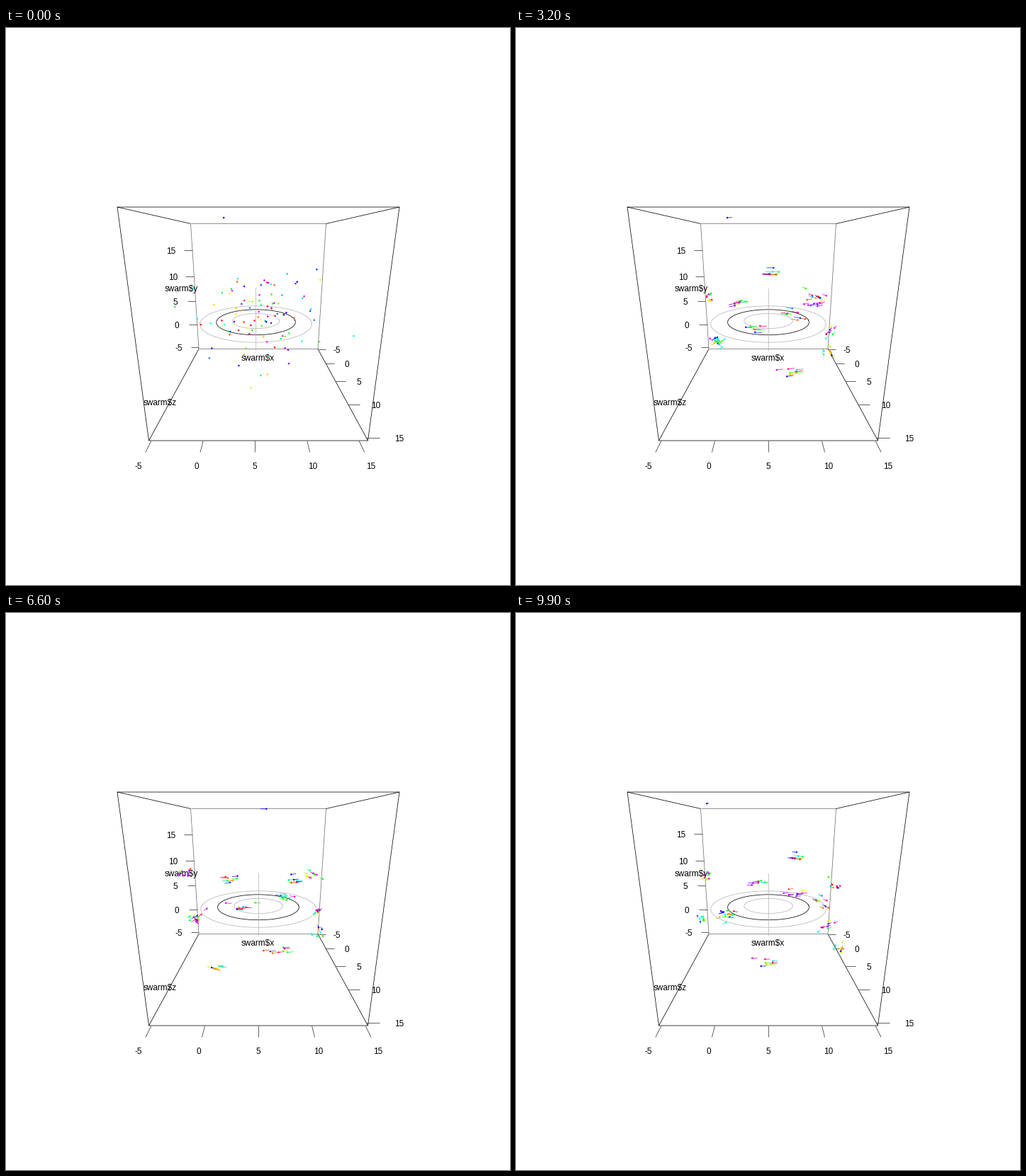
A matplotlib script that plays this animation: 711 by 787 pixels, repeating every 10000 ms.

```python
import numpy as np
import matplotlib.pyplot as plt
from matplotlib.animation import FuncAnimation
from matplotlib.collections import LineCollection
from matplotlib.colors import hsv_to_rgb

W, H, FRAMES, STEP = 711, 787, 100, 100
CX = 355.5
PT = 0.72  # points per pixel at 100 dpi
VALUES = range(-5, 16, 5)
LEFT, RIGHT, FLOOR, BACK, FRONT = -5.25, 15.25, -5.45, -5.28, 15.47
rng = np.random.default_rng(12)

fig = plt.figure(figsize=(W / 100, H / 100), dpi=100, facecolor="white")
ax = fig.add_axes([0, 0, 1, 1])
ax.set_xlim(-0.5, W - 0.5)
ax.set_ylim(H - 0.5, -0.5)
ax.axis("off")


def project(x, y, z, q=0):
    """Perspective view of the box; q widens the x range at the start."""
    u = (x - 5) / 10.25 * (1 - 0.029 * q) - 0.029 * q
    v = (y - FLOOR) / 25.2
    s = (z - BACK) / 20.75
    w = 0.011876 - 0.001425 * v - 0.00542 * s
    return CX + u / w, (5.380 - 2.495 * v - 1.61 * s) / w


def segments(lines, color):
    return ax.add_collection(
        LineCollection(lines, colors=color, linewidths=0.75 * PT))


def label(x, y, text):
    return ax.text(x, y, text, ha="center", va="center_baseline", zorder=4,
                   family="Liberation Sans", fontsize=11.8 * PT,
                   parse_math=False)


def outward(x, scale):
    return CX + scale * (x - CX)


# Box: top left, top right, bottom right, bottom left
back = [(260, 276), (451, 276), (439.5, 453), (271.5, 453)]
front = [(156.5, 252.5), (554.5, 252.5), (510, 582.5), (201, 582.5)]
segments([back[2:], back[:2], back[1:3], back[::3]], "#6e6e6e")
segments([front + front[:1], *zip(back, front)], "black")

# Axis names, ticks and tick labels
for x, y, name in [(355, 465.5, "x"), (246.5, 367, "y"), (217, 528, "z")]:
    label(x, y, "swarm$" + name)

z_lines = []
for val in VALUES:
    x, y = project(RIGHT, FLOOR, val)
    z_lines.append([(x, y), (outward(x, 1.127), y)])
    label(outward(x, 1.305), y + 0.5, str(val))
segments(z_lines, "#333333")

x_ticks = segments([], "#333333")
y_ticks = segments([], "#333333")
x_labels = [label(0, 618.5, str(v)) for v in VALUES]
y_labels = [label(0, 0, str(v)) for v in VALUES]

# Rings and pole around which the swarm turns
circle = np.linspace(0, 2 * np.pi, 181)
rings = [(r, ax.plot([], [], color=c, lw=0.75 * PT)[0])
         for r, c in [(3, "#b4b4b4"), (5, "black"), (7, "#b4b4b4")]]
pole, = ax.plot([], [], color="#b4b4b4", lw=0.75 * PT)

# Flocks on stacked orbits; the last "flock" is one loner near the ceiling
FLOCKS, N = 12, 100
flock_height = np.r_[np.linspace(362, 468, FLOCKS), 271]
flock_phase = 2.28 + 2.4 * np.r_[1:FLOCKS + 1, 0]
flock_rad = np.r_[rng.uniform(72, 92, FLOCKS), 75]
LONER_TILT = -0.06

# Members: a scattered start that settles into a place within the flock
home = np.r_[rng.permutation(np.arange(N - 1) % FLOCKS), FLOCKS]
grouped = home < FLOCKS
along, across, rise = rng.normal(0, [[8.5], [4], [2.6]], (3, N)) * grouped
height, phase, rad = flock_height[home], flock_phase[home], flock_rad[home]
lead = rng.uniform(-np.pi, np.pi, N) * grouped
rad_gap = (np.hypot(*rng.normal(0, 40, (2, N))) - rad) * grouped
height_gap = (np.clip(rng.normal(408, 35, N), 330, 480) - height) * grouped
colors = hsv_to_rgb([(h, 1, 1) for h in np.r_[np.arange(N - 1) / N, 0.68]])

arrows = LineCollection([], colors=colors, linewidths=0.75 * PT, zorder=5)
ax.add_collection(arrows)
dots = ax.scatter(np.zeros(N), np.zeros(N), s=(2.5 * PT) ** 2,
                  c=colors, linewidths=0, zorder=6)


def swarm(t):
    """Places of all members and their directions on screen."""
    loose = np.clip(1 - t / 18, 0, 1) ** 1.5
    tight = 1 - loose
    ang = phase - 15 * (1 - np.exp(-t / 60)) + loose * lead
    r = rad + 0.2 * t + loose * rad_gap + tight * across
    level = height + loose * height_gap
    k = np.where(grouped, 0.00227 * (level - 272), LONER_TILT)
    u = tight * along
    sin, cos = np.sin(ang), np.cos(ang)
    x = CX + r * cos + u * sin
    y = level + k * (r * sin - u * cos) + tight * rise
    return np.c_[x, y], np.c_[sin, -k * cos]


def draw(t):
    q = max(0, 1 - t / 8)

    x_lines, y_lines = [], []
    for i, val in enumerate(VALUES):
        x = project(val, FLOOR, FRONT, q)[0]
        x_lines.append([(x, 583), (outward(x, 1.053), 599)])
        x_labels[i].set_x(outward(x, 1.118))

        x, y = project(LEFT, val, BACK)
        y += 0.45 * i * (0.4 - t / FRAMES)
        y_lines.append([(x, y), (outward(x, 1.13), y)])
        y_labels[i].set_position((outward(x, 1.327), y + 0.5))
    x_ticks.set_segments(x_lines)
    y_ticks.set_segments(y_lines)

    for r, ring in rings:
        ring.set_data(*project(5 + r * np.cos(circle), 5,
                               5 + r * np.sin(circle), q))
    pole.set_data(*project(np.array([5, 5]), np.array([0, 10]), 5, q))

    pos, way = swarm(t)
    length = 0 if t == 0 else 11 - 0.04 * t
    arrows.set_segments(np.stack([pos, pos + length * way], axis=1))
    dots.set_offsets(pos)
    return []


anim = FuncAnimation(fig, draw, frames=FRAMES, interval=STEP,
                     init_func=lambda: draw(0), repeat=True, repeat_delay=0)
plt.show()
```
